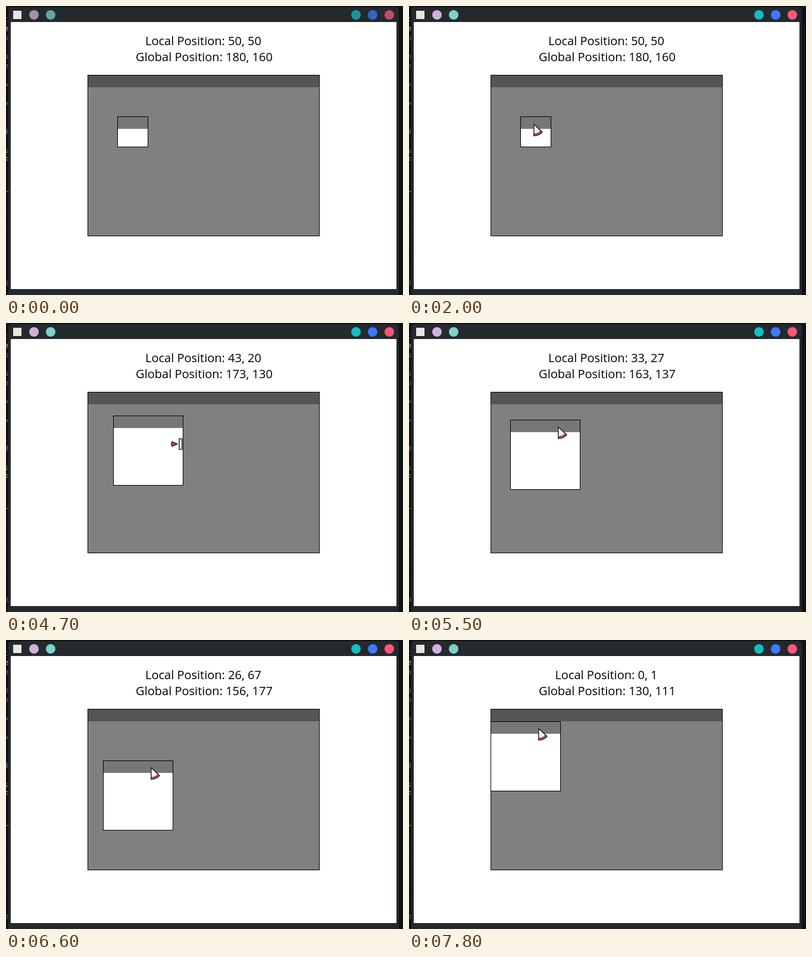
Write an HTML page with a canvas that moves like this. It is 667 px wide and 487 px high and loops after 8000 ms.

```html
<!DOCTYPE html>
<html lang="en">
<head>
<meta charset="utf-8">
<title>Nested windows</title>
<style>
html, body { margin: 0; width: 100%; height: 100%; overflow: hidden; background: #101315; }
canvas { display: block; }
</style>
</head>
<body>
<canvas id="stage" width="667" height="487"></canvas>
<script>
const ctx = document.getElementById('stage').getContext('2d');
const LOOP = 8000, STEP = 100;
const INK = '#292c2e', RED = '#c8483c', PALE = '#f1f1f0';

// Key poses: [time, ...values], eased in between
const position = [
  [2200, 50, 50], [2600, 43, 20], [5350, 43, 20], [5600, 27, 31], [5700, 27, 31],
  [6000, -10, 51], [6300, 5, 102], [6600, 26, 67], [7500, 5, 2], [7600, 5, 2], [7800, 0, 1]
];
const size = [[3900, 52], [4300, 122], [4400, 118]];
const pointer = [
  [200, 651, 27], [300, 326, 0], [800, 324, 13], [1400, 324, 13], [1800, 209, 205],
  [1900, 209, 205], [2000, 209, 198], [3200, 202, 168], [3500, 238, 221],
  [4500, 297, 270], [4700, 297, 204], [5350, 260, 167]
];

function at(keys, t) {
  const i = keys.findIndex(k => k[0] > t);
  if (i < 1) return keys.at(i).slice(1);
  const a = keys[i - 1], b = keys[i], p = (t - a[0]) / (b[0] - a[0]);
  const ease = p * p * (3 - 2 * p);
  return a.slice(1).map((v, n) => Math.round(v + (b[n + 1] - v) * ease));
}

function rect(x, y, w, h, color) {
  ctx.fillStyle = color;
  ctx.fillRect(x, y, w, h);
}

function text(string, x, y, color) {
  ctx.fillStyle = color;
  ctx.fillText(string, x, y);
}

function panel(x, y, w, h, bar, body) {
  rect(x, y, w, h, '#000');
  rect(x + 1, y + 1, w - 2, h - 2, body);
  rect(x + 1, y + 1, w - 2, 20, bar);
}

function shape(d, fill) {
  const path = new Path2D(d);
  ctx.fillStyle = fill;
  ctx.fill(path);
  ctx.stroke(path);
}

const cursors = {
  arrow() {
    shape('M.8 1.2V20.7A19.5 19.5 0 0 0 15 14.6Z', RED);
    shape('M.8 1.2V17.6A16.4 16.4 0 0 0 12.7 12.4Z', PALE);
    // Cover the inner arc's ink, leaving only the band's colour
    ctx.strokeStyle = RED;
    ctx.stroke(new Path2D('M1.8 17.9A16.7 16.7 0 0 0 12.2 13.2'));
  },
  // Origin at the bottom right of the bracket
  corner() {
    shape('M-5.5 -18.5H-.8V-.8H-18.5V-5.5H-5.5Z', PALE);
    shape('M-9 -8.5L-18 -12Q-16.5 -16 -12.5 -17.5Z', RED);
  },
  // Origin at the middle of the bar's right side
  side() {
    shape('M-6 -9H-1.2V9H-6Z', PALE);
    shape('M-9 0L-18 -3.8Q-20 0 -18 3.8Z', RED);
  }
};

function cursor(kind, x, y) {
  ctx.save();
  ctx.translate(x, y);
  ctx.lineJoin = 'round';
  ctx.lineWidth = 1.5;
  ctx.strokeStyle = INK;
  cursors[kind]();
  ctx.restore();
}

function editor() {
  const tint = { e: '#bbb', F: '#bbb', '=': '#4b9a4b', s: '#4b9a4b', J: '#a66580', _: '#7a9b30' };
  ctx.textAlign = 'right';
  ctx.font = '13px "Noto Sans Mono", monospace';
  [...'ceo oo = = .J sF  _ . .  .  o'].forEach((c, i) => text(c, 4, 26 + i * 15.85, tint[c] || '#666'));
}

function dot(x, color) {
  ctx.fillStyle = color;
  ctx.beginPath();
  ctx.arc(x, 15, 8, 0, 7);
  ctx.fill();
}

function desktop(focus) {
  rect(0, 0, 667, 487, '#101315');
  editor();
  ctx.fillStyle = '#24292e';
  ctx.beginPath();
  ctx.roundRect(4, 2, 656, 490, 5);
  ctx.fill();
  rect(8, 27, 648, 450, '#fff');
  rect(12, 8, 14, 14, '#e9e5df');
  ctx.globalAlpha = 0.74 + 0.26 * focus;
  ['#cfb2dc', '#7ad2cb'].forEach((c, i) => dot(47 + 28 * i, c));
  ['#16bcc6', '#3c7aff', '#ff5677'].forEach((c, i) => dot(588 + 28 * i, c));
  ctx.globalAlpha = 1;
}

function draw(t) {
  const [x, y] = at(position, t), [side] = at(size, t);
  const left = x + 137, top = y + 136;

  desktop(Math.min(1, Math.max(0, (t - 900) / 200)));

  ctx.textAlign = 'center';
  ctx.font = '20px "Open Sans", "Noto Sans", sans-serif';
  text(`Local Position: ${x}, ${y}`, 331.5, 66, '#000');
  text(`Global Position: ${x + 130}, ${y + 110}`, 333, 93, '#000');

  panel(137, 116, 390, 272, '#555', '#808080');
  ctx.save();
  ctx.beginPath();
  ctx.rect(138, 117, 388, 270);
  ctx.clip();
  panel(left, top, side, side, '#777', '#fff');
  ctx.restore();

  const during = (from, to) => t >= from && t < to;
  if (t < 100 || during(200, 400)) return;
  if (during(2300, 3300)) cursor('arrow', left + 22, top + 12);
  else if (during(3700, 4600)) cursor('corner', left + side + 3, top + side - 3);
  else if (t >= 5400) cursor('arrow', left + 80, top + 11);
  else cursor(during(4600, 4900) ? 'side' : 'arrow', ...at(pointer, t));
}

function frame(now) {
  draw(Math.floor(now % LOOP / STEP) * STEP);
  requestAnimationFrame(frame);
}
requestAnimationFrame(frame);
</script>
</body>
</html>
```
